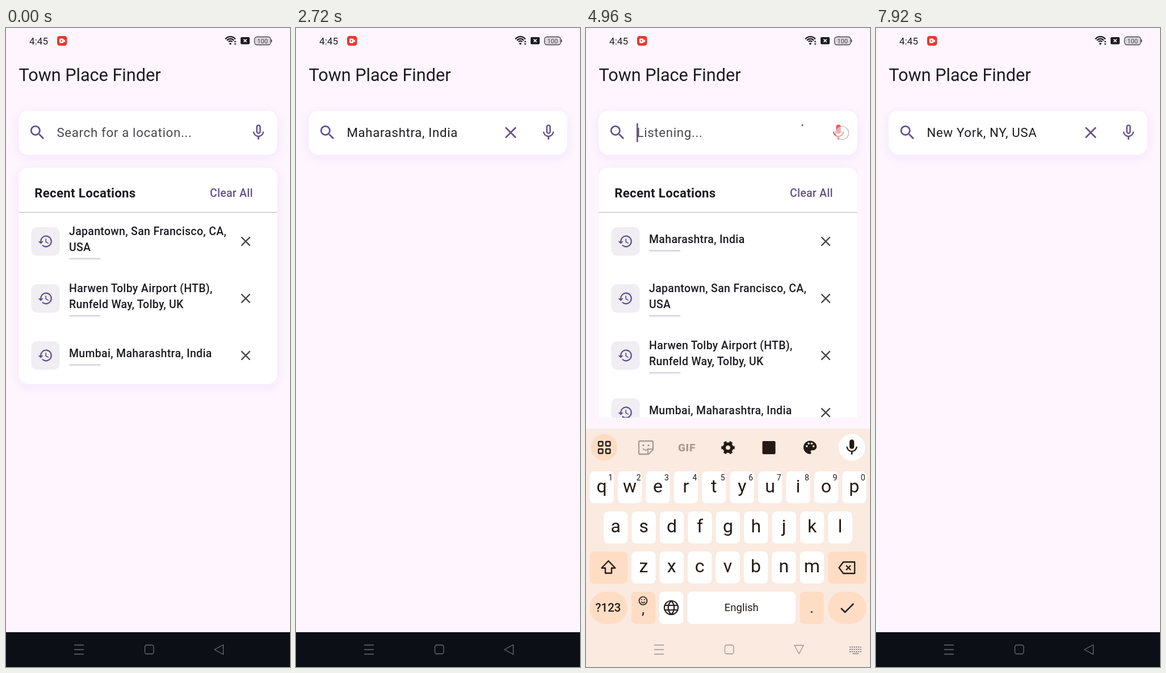
An HTML page for the animation above (8000 ms loop, 500x1120 px).

```html
<!DOCTYPE html>
<html lang="en">
<head>
<meta charset="utf-8">
<title>Place search</title>
<style>
html, body { margin: 0; width: 100%; height: 100%; overflow: hidden; background: #fef5ff; }
svg { display: block; width: 100vw; height: 100vh; font-family: Roboto, "Noto Sans", sans-serif; }
text { white-space: pre; }
</style>
</head>
<body>
<svg id="stage" viewBox="0 0 500 1120" xmlns="http://www.w3.org/2000/svg"></svg>
<script>
const LOOP = 8000, STEP = 40;
const INK = '#1d1b20', PURPLE = '#625290', KEY_INK = '#231a14', PEACH = '#ffdcc4', KB_BG = '#faeae0', GREY = '#a99b93';
const KB_TOP = 702, KB_TRAVEL = 429;

const ICON = {
  search: 'M15.5 14h-.79l-.28-.27A6.47 6.47 0 0 0 16 9.5 6.5 6.5 0 1 0 9.5 16c1.61 0 3.09-.59 4.23-1.57l.27.28v.79l5 4.99L20.49 19l-4.99-5zm-6 0a4.5 4.5 0 1 1 0-9 4.5 4.5 0 0 1 0 9z',
  micLine: 'M12 14c1.66 0 3-1.34 3-3V5a3 3 0 0 0-6 0v6c0 1.66 1.34 3 3 3zm-1.2-9.1a1.2 1.2 0 0 1 2.4 0v6.2a1.2 1.2 0 0 1-2.4 0zM17.3 11c0 3-2.54 5.1-5.3 5.1S6.7 14 6.7 11H5c0 3.41 2.72 6.23 6 6.72V21h2v-3.28c3.28-.48 6-3.3 6-6.72z',
  mic: 'M12 14c1.66 0 3-1.34 3-3V5a3 3 0 0 0-6 0v6c0 1.66 1.34 3 3 3zM17.3 11c0 3-2.54 5.1-5.3 5.1S6.7 14 6.7 11H5c0 3.41 2.72 6.23 6 6.72V21h2v-3.28c3.28-.48 6-3.3 6-6.72z',
  history: 'M13 3a9 9 0 0 0-9 9H1l3.89 3.89.07.14L9 12H6a7 7 0 1 1 2.06 4.94l-1.42 1.42A9 9 0 1 0 13 3zm-1 5v5l4.28 2.54.72-1.21-3.5-2.08V8z',
  pin: 'M12 2a7 7 0 0 0-7 7c0 5.25 7 13 7 13s7-7.75 7-13a7 7 0 0 0-7-7zM7 9a5 5 0 0 1 10 0c0 2.88-2.88 7.19-5 9.88C9.92 16.21 7 11.85 7 9zm5-2.5a2.5 2.5 0 1 0 0 5 2.5 2.5 0 0 0 0-5z',
  palette: 'M12 3a9 9 0 0 0 0 18c.83 0 1.5-.67 1.5-1.5 0-.39-.15-.74-.39-1.01-.23-.26-.38-.61-.38-.99 0-.83.67-1.5 1.5-1.5H16c2.76 0 5-2.24 5-5 0-4.42-4.03-8-9-8z'
};

const icon = (name, x, y, size, fill, extra = '') =>
  `<g ${extra}><path d="${ICON[name]}" fill="${fill}" fill-rule="evenodd" transform="translate(${x} ${y}) scale(${size / 24}) translate(-12 -12)"/></g>`;
const rect = (x, y, w, h, r, fill, extra = '') =>
  `<rect x="${x}" y="${y}" width="${w}" height="${h}" rx="${r}" fill="${fill}" ${extra}/>`;
const circle = (x, y, r, fill, extra = '') => `<circle cx="${x}" cy="${y}" r="${r}" fill="${fill}" ${extra}/>`;
const line = (d, color, width, extra = '') =>
  `<path d="${d}" fill="none" stroke="${color}" stroke-width="${width}" ${extra}/>`;
const text = (s, x, y, size, fill, extra = '') =>
  `<text x="${x}" y="${y}" font-size="${size}" fill="${fill}" ${extra}>${s}</text>`;
const cross = (x, y, h, color, w, extra = '') =>
  line(`M${x - h} ${y - h}l${2 * h} ${2 * h}m0 ${-2 * h}l${-2 * h} ${2 * h}`, color, w, extra);
const MID = 'text-anchor="middle"';

function statusBar() {
  const arcs = [4, 7.5, 11].map(r => {
    const d = r * 0.8;
    return line(`M${395 - d} ${27 - d * 0.85}A${r} ${r} 0 0 1 ${395 + d} ${27 - d * 0.85}`, INK, 2.3);
  }).join('');
  return text('4:45', 41, 28.5, 17, INK, 'letter-spacing=".1"') +
    rect(90, 14, 17.5, 17, 4.5, '#e8382f') + rect(94, 18.5, 7.5, 8, 2, '#fff') +
    `<path d="M101 22.5l3-2.5v5.5z" fill="#fff"/>` + circle(97.7, 22.5, 1.3, '#e8382f') +
    `<g id="statusIcons">${arcs}${circle(395, 27.5, 1.8, INK)}
     <path d="M401.5 25l2-3 2 3zm0 2l2 3 2-3z" fill="${INK}"/>
     ${rect(413, 16, 16, 12.5, 2, INK)}${cross(421, 22.2, 2.6, '#fff', 1.6)}
     ${rect(437.5, 15.5, 28.5, 14, 4.5, '#dcd6de', 'stroke="#4a464d" stroke-width="1.3"')}
     ${rect(466.5, 20, 1.8, 5, 1, '#4a464d')}${text('100', 451.7, 26.6, 11.2, '#4a464d', MID)}</g>
     <g id="privacy">${rect(0, 0, 0, 0, 0, '#4fce86', 'id="pill"')}
     ${icon('mic', 463.5, 22, 16, '#fff', 'id="pillMic"')}</g>`;
}

function navIcons(color, back) {
  return line('M120 1081.5h17m-17 8h17m-17 8h17', color, 1.3) +
    rect(244.5, 1081.5, 15.5, 15.5, 3.5, 'none', `stroke="${color}" stroke-width="1.3"`) +
    line(back, color, 1.3, 'stroke-linejoin="round"');
}

function searchField() {
  return rect(22.5, 145, 455, 77, 17, '#fff', 'filter="url(#soft)"') +
    icon('search', 55.3, 183.2, 33.3, PURPLE) +
    text('', 89.5, 190.5, 22.2, INK, 'id="query" letter-spacing=".69"') +
    rect(89, 167, 2.6, 33, 0, PURPLE, 'id="cursor"') +
    cross(378, 183.2, 9, PURPLE, 2.7, 'id="clear"') +
    line('', PURPLE, 3.2, 'id="spinner"') +
    circle(444.5, 183, 27, '#f5f3f6', 'id="ripple"') +
    icon('micLine', 444.5, 183, 33.3, PURPLE, 'id="micIdle"') +
    icon('mic', 444.5, 183, 33.3, '#ea5a56', 'id="micLive"');
}

function row(label, y, glyph, removable) {
  const lines = label.split('|');
  const two = lines.length > 1;
  const first = two ? y - 11 : y + 3;
  return rect(44.5, y - 25, 50, 50, 10, '#f0edf3') + icon(glyph, 69.3, y, 27.8, PURPLE) +
    lines.map((s, i) => text(s, 111, first + i * 28, 19.44, INK, 'font-weight="500" letter-spacing=".35"')).join('') +
    rect(111, y + (two ? 29 : 15), 55.5, 2.8, 1.4, '#dad7e1') +
    (removable ? cross(422, y, 7.6, '#46434a', 2.2) : '');
}

const RECENT = ['Japantown, San Francisco, CA,|USA', 'Harwen Tolby Airport (HTB),|Runfeld Way, Tolby, UK', 'Mumbai, Maharashtra, India'];
const CARDS = {
  none: null,
  recent: { recent: true, rows: RECENT },
  recentPlus: { recent: true, rows: ['Maharashtra, India', ...RECENT] },
  maha: { rows: ['Maharashtra, India', 'Mahabaleshwar,|Maharashtra, India', 'Mahabalipuram, Tamil Nadu,|India', 'Mahadevapura, Bengaluru,|Karnataka, India', 'Mahape, Maharashtra, India'] },
  york: { rows: ['New York, NY, USA', 'New York Mills, MN, USA', 'New York Mills, NY, USA', 'Yorktown Heights, NY, USA', 'Yorkville, NY, USA'] }
};
const cardTop = card => card.recent ? 324 : 250;
const cardBottom = card => cardTop(card) + card.rows.length * 100;

function cardMarkup(card) {
  if (!card) return '';
  const top = cardTop(card);
  const header = text('Recent Locations', 50.3, 297, 22.2, INK, 'font-weight="700" letter-spacing=".33"') +
    text('Clear All', 359, 296, 19.44, PURPLE, 'font-weight="500" letter-spacing=".28"') +
    line('M22.5 323.2h455', '#c9c6cc', 1.4);
  return rect(22.5, 245, 455, cardBottom(card) - 245, 17, '#fff', 'filter="url(#soft)"') +
    (card.recent ? header : '') +
    card.rows.map((s, i) => row(s, top + 50 + i * 100, card.recent ? 'history' : 'pin', card.recent)).join('');
}

function keyboard() {
  const pitch = 49.4;
  const letterRow = (letters, x0, y, digits) => [...letters].map((c, i) => {
    const x = x0 + i * pitch;
    return rect(x - 21.2, y, 42.4, 56, 8, '#fff') + text(c, x, y + 36.5, 32, KEY_INK, MID) +
      (digits ? text((i + 1) % 10, x + 15.5, y + 16, 14, KEY_INK, MID) : '');
  }).join('');
  const special = (x, y, w, r, fill = PEACH) => rect(x, y, w, 56.5, r, fill);
  const grid = [0, 13].map(dx => [0, 13].map(dy =>
    rect(22 + dx, 725 + dy, 7.5, 7.5, 1, 'none', `stroke="${KEY_INK}" stroke-width="2.3"`)).join('')).join('');
  const holes = [[388.7, 733], [392, 728.3], [397.4, 728.3], [400.6, 733]].map(p => circle(...p, 1.8, KB_BG)).join('');
  const tools = line('M95 724h21q2 0 2 2v13l-8 8h-15q-2 0-2-2v-19q0-2 2-2z', GREY, 2.3) +
    line('M118 738h-7q-2 0-2 2v7M100 737q5 6 10 0', GREY, 2) + circle(101, 731.5, 1.7, GREY) + circle(110, 731.5, 1.7, GREY) +
    text('GIF', 177.5, 741.8, 19, GREY, MID + ' font-weight="800" letter-spacing=".6"') +
    circle(250, 735.5, 6.6, 'none', `stroke="${KEY_INK}" stroke-width="5.5"`) +
    circle(250, 735.5, 9.8, 'none', `stroke="${KEY_INK}" stroke-width="4" pathLength="12" stroke-dasharray="1 1" stroke-dashoffset=".5"`) +
    rect(310.5, 724, 23, 23, 2, KEY_INK) + icon('palette', 394.5, 735, 31, KEY_INK) + holes;
  const strip = line('M181.5 718v34M316.5 718v34', '#cfc0b7', 1.2) +
    [120, 248].map((x, i) => text('', x, 744, 24.5, KEY_INK, `${MID} id="word${i}"`)).join('') +
    `<g transform="translate(376 744) scale(.8 1)">${text('', 0, 0, 24.5, KEY_INK, MID + ' id="word2"')}</g>`;
  const face = circle(100.5, 1004, 7, 'none', `stroke="${KEY_INK}" stroke-width="1.7"`) +
    circle(98, 1002, 1.1, KEY_INK) + circle(103, 1002, 1.1, KEY_INK) + line('M97 1005.5q3.5 4 7 0', KEY_INK, 1.5);
  const globe = line('M150 1004a12 12 0 1 0 .01 0zM150 1004c-7 7-7 17 0 24c7-7 7-17 0-24M139 1012h22M139 1020h22', KEY_INK, 2.2);
  return rect(0, KB_TOP, 500, 480, 0, KB_BG) +
    circle(32, 735, 23.5, PEACH) + grid + circle(468, 735, 23.5, '#fff') + icon('mic', 468, 735, 33, KEY_INK) +
    `<g id="tools">${tools}</g><g id="strip">${strip}</g>` +
    letterRow('qwertyuiop', 27.7, 777, true) + letterRow('asdfghjkl', 52.3, 847.5) + letterRow('zxcvbnm', 101.4, 917.5) +
    special(6.5, 917.5, 66.5, 8) + line('M39.5 934l12 12.5h-6.5v9h-11v-9h-6.5z', KEY_INK, 2.3, 'stroke-linejoin="round"') +
    special(426, 917.5, 67.5, 8) + line('M453 936h20v20h-20l-7.5-10z', KEY_INK, 2.3, 'stroke-linejoin="round"') + cross(462, 946, 4, KEY_INK, 2.2) +
    special(6.5, 988, 66.5, 28) + text('?123', 39, 1023, 20.5, KEY_INK, MID + ' font-weight="500"') +
    special(80, 988, 42.4, 8) + face + text(',', 100.5, 1027, 26, KEY_INK, MID) +
    special(129, 988, 42.4, 8, '#fff') + globe +
    special(178.5, 988, 190.5, 8, '#fff') + text('English', 273.7, 1022, 18.5, KEY_INK, MID) +
    special(376.3, 988, 42.4, 8) + text('.', 397.5, 1025, 26, KEY_INK, MID) +
    special(426, 988, 67.5, 28) + line('M449 1017l7 7 15-15', KEY_INK, 2.5) +
    navIcons('#9c928d', 'M367 1082h16l-8 15z') +
    line('M464 1085h21m-21 4h21m-21 4h21', '#8d837e', 2.2, 'stroke-dasharray="2.2 1.5"') + line('M469 1096.5h11', '#8d837e', 1.6);
}

document.getElementById('stage').innerHTML = `<defs>
  <filter id="soft" x="-10%" y="-30%" width="120%" height="170%"><feDropShadow dx="0" dy="4" stdDeviation="8.5" flood-color="#5a3fb0" flood-opacity=".075"/></filter>
  <clipPath id="view">${rect(22, 222, 456, 461, 0, '#000', 'id="viewRect"')}</clipPath></defs>
  ${rect(0, 0, 500, 1120, 0, '#fef5ff')}${statusBar()}
  ${text('Town Place Finder', 22.5, 93, 30.6, INK)}
  <g id="card"></g>${searchField()}
  ${rect(0, 1059, 500, 61, 0, '#0d0f16')}${navIcons('#6b6d73', 'M367 1089.5l15.5-8.5v17z')}
  <g id="keyboard">${keyboard()}</g>
  ${circle(0, 0, 11.5, '#fff', 'id="touch" fill-opacity=".5" stroke="#b5b2b8" stroke-width="1.2"')}`;

const el = {};
document.querySelectorAll('[id]').forEach(n => { el[n.id] = n; });
const show = (node, on) => node.setAttribute('display', on ? 'inline' : 'none');
const set = (node, attrs) => { for (const k in attrs) node.setAttribute(k, attrs[k]); };
const clamp = v => Math.max(0, Math.min(1, v));
const ramp = (t, from, to) => clamp((t - from) / (to - from));
const between = (t, a, b) => t >= a && t < b;
const latest = (track, t) => track.filter(k => k[0] <= t).pop();

const PICK_1 = 2560, CLEARED = 3640, PICK_2 = 7560;
const QUERIES = [[0, ''], [960, 'm'], [1170, 'ma'], [1380, 'mah'], [1590, 'maha'], [PICK_1, 'Maharashtra, India'],
  [CLEARED, ''], [6760, 'New York'], [PICK_2, 'New York, NY, USA']];
const SPINS = [[1790, 2240], [4946, 7160]];
const CARD_TRACK = [[0, 'recent'], [SPINS[0][1], 'maha'], [PICK_1, 'none'], [CLEARED, 'recentPlus'], [SPINS[1][1], 'york'], [PICK_2, 'none']];
const WORDS = { m: ['m', 'M', 'my'], ma: ['ma', 'Ma', 'may'], mah: ['mah', 'Mah', 'Maha'], maha: ['maha', 'Maha', 'Maharashtra'] };
const FOCUS = [[600, PICK_1], [4600, PICK_2]];
const KEYBOARD_SPANS = [[628, PICK_1 + 40], [4680, PICK_2 + 40]];
const LISTEN = [4910, 6480];
const BLINK_STARTS = [600, 960, 1170, 1380, 1590, 4600, 4900, 6760];
const TAPS = [[580, 250, 183], [4600, 250, 183], [4920, 451, 184]];

// Material standard curve, cubic-bezier(.4, 0, .2, 1)
function standardEase(x) {
  let lo = 0, hi = 1, s = x;
  for (let i = 0; i < 18; i++) {
    s = (lo + hi) / 2;
    if (1.2 * (1 - s) ** 2 * s + 0.6 * (1 - s) * s * s + s ** 3 < x) lo = s; else hi = s;
  }
  return 3 * (1 - s) * s * s + s ** 3;
}

function spinnerPath(elapsed) {
  const ms = elapsed * 2.5, phase = ms / 1333 % 1, turn = 2 * Math.PI;
  const head = standardEase(clamp(phase * 2)) * 0.75, tail = standardEase(clamp(phase * 2 - 1)) * 0.75;
  const start = turn * (tail - 0.25 + ms / 2222 + phase / 4);
  const sweep = Math.max(turn * (head - tail), 0.18);
  const at = a => `${378 + 13 * Math.cos(a)} ${183 + 13 * Math.sin(a)}`;
  return `M${at(start)}A13 13 0 ${sweep > Math.PI ? 1 : 0} 1 ${at(start + sweep)}`;
}

function keyboardOffset(t) {
  const [up, down] = KEYBOARD_SPANS[t < CLEARED ? 0 : 1];
  const raised = t < down ? 1 - (1 - ramp(t, up, up + 120)) ** 3 : 1 - ramp(t, down, down + 110) ** 2;
  return KB_TRAVEL * (1 - raised);
}

let cardName;
function render(t) {
  const query = latest(QUERIES, t)[1];
  const listening = between(t, ...LISTEN);
  el.query.textContent = query || (listening ? 'Listening...' : 'Search for a location...');
  el.query.setAttribute('fill', query ? INK : '#49454f');

  const focused = FOCUS.some(span => between(t, ...span));
  const blink = BLINK_STARTS.filter(b => b <= t).pop();
  show(el.cursor, focused && Math.floor((t - blink) / 200) % 2 === 0);
  el.cursor.setAttribute('x', query ? 90.5 + el.query.getComputedTextLength() : 89);

  const spin = SPINS.find(span => between(t, ...span));
  show(el.spinner, spin);
  if (spin) el.spinner.setAttribute('d', spinnerPath(t - spin[0]));
  show(el.clear, query && !spin);
  show(el.micLive, listening);
  show(el.micIdle, !listening);
  el.ripple.setAttribute('opacity', t < CLEARED ? 0 : 1 - ramp(t, CLEARED + 20, CLEARED + 200));

  const offset = keyboardOffset(t);
  show(el.keyboard, offset < KB_TRAVEL);
  el.keyboard.setAttribute('transform', `translate(0 ${offset})`);
  const words = WORDS[query];
  show(el.strip, words);
  show(el.tools, !words);
  if (words) words.forEach((w, i) => { el['word' + i].textContent = w; });

  const name = latest(CARD_TRACK, t)[1], card = CARDS[name];
  if (name !== cardName) el.card.innerHTML = cardMarkup(card);
  cardName = name;
  const floor = Math.min(1040, KB_TOP + offset - 19);
  el.viewRect.setAttribute('height', floor - 222);
  el.card.setAttribute('clip-path', card && cardBottom(card) > floor ? 'url(#view)' : 'none');

  // The status icons make room, then the chip grows; on the way back it shrinks first.
  const room = ramp(t, 5000, 5080) - ramp(t, 6260, 6380);
  const chip = ramp(t, 5060, 5160) - ramp(t, 6160, 6260);
  show(el.privacy, between(t, 5060, 7300));
  set(el.pill, { x: 474.5 - 28 * chip, y: 19 - 8 * chip, width: 6 + 28 * chip, height: 6 + 16 * chip, rx: 3 + 8 * chip });
  el.pillMic.setAttribute('opacity', chip);
  el.statusIcons.setAttribute('transform', `translate(${-26 * room} 0)`);

  const tap = TAPS.find(([a]) => between(t, a, a + 70));
  show(el.touch, tap);
  if (tap) set(el.touch, { cx: tap[1], cy: tap[2] });
}

const begin = performance.now();
function tick() {
  const t = (performance.now() - begin) % LOOP;
  render(Math.floor((t + 2) / STEP) * STEP % LOOP);
  requestAnimationFrame(tick);
}
tick();
</script>
</body>
</html>
```
